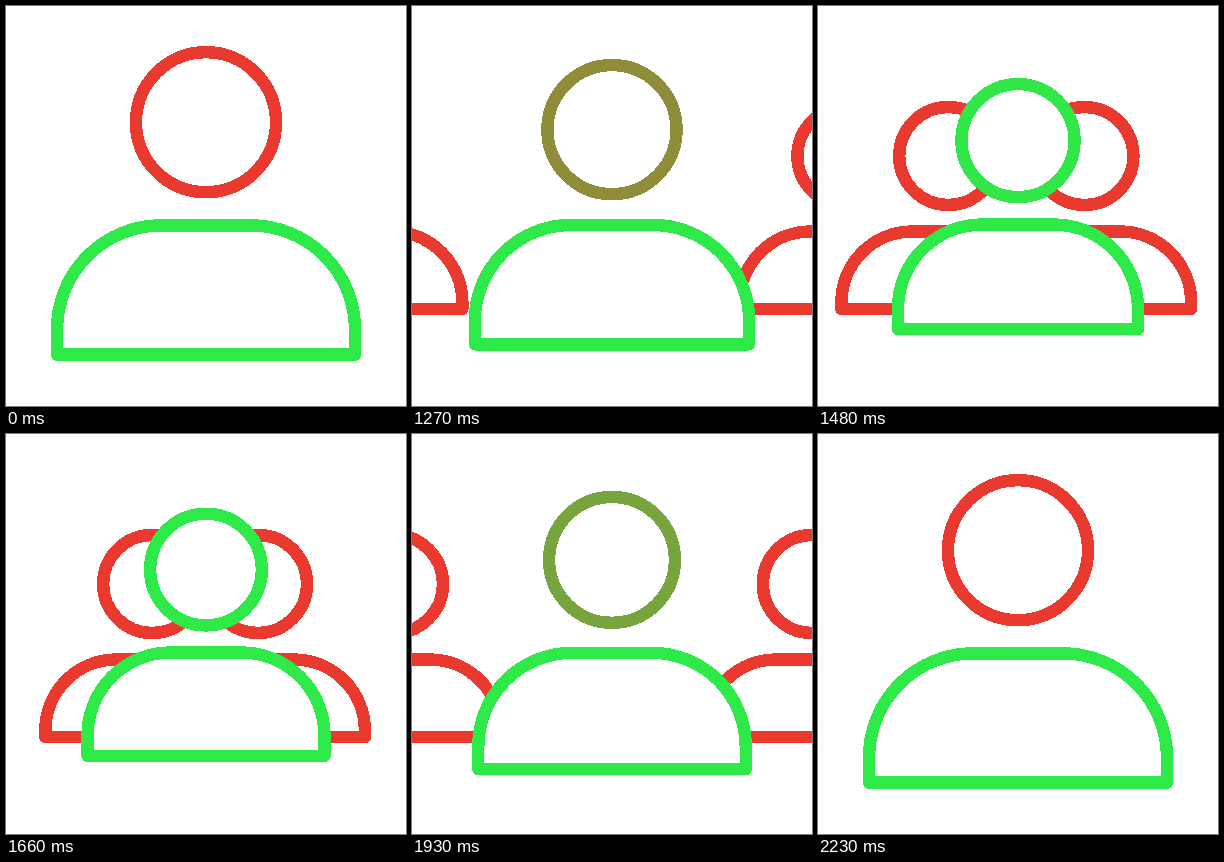
Animation of 400 by 400 pixels, one loop 2260 ms. Source, as an HTML page:

```html
<!DOCTYPE html>
<html lang="en">
<head>
<meta charset="utf-8">
<style>
  html, body { margin: 0; height: 100%; overflow: hidden; background: #fff; }
  svg { display: block; }
  svg * { fill: #fff; stroke-width: 12.4; stroke-linejoin: round; shape-rendering: crispEdges; }
</style>
</head>
<body>
<svg width="400" height="400" viewBox="0 0 400 400"></svg>
<script>
const svg = document.querySelector("svg");
const LOOP = 2260, STEP = 30, START = 1000, MOVE = 600, END = 2230;
const RED = [234, 57, 46], GREEN = [45, 234, 72];

const mix = (a, b, p) => a + (b - a) * p;
const clamp = v => Math.min(1, Math.max(0, v));
const rgb = c => `rgb(${c.map(Math.round)})`;

// cubic-bezier(.58, 0, .42, 1), solved by bisection
function ease(x) {
  if (x <= 0 || x >= 1) return clamp(x);
  let lo = 0, hi = 1, t;
  for (let i = 0; i < 24; i++) {
    t = (lo + hi) / 2;
    const s = 1 - t;
    if (3 * s * s * t * 0.58 + 3 * s * t * t * 0.42 + t * t * t < x) lo = t;
    else hi = t;
  }
  return t * t * (3 - 2 * t);
}

function add(tag) {
  return svg.appendChild(document.createElementNS("http://www.w3.org/2000/svg", tag));
}

function set(el, attrs) {
  for (const name in attrs) el.setAttribute(name, attrs[name]);
}

function person() {
  const body = add("path"), head = add("circle");
  return {
    body(x, top, bottom, half, r, color) {
      const flat = 2 * (half - r);
      set(body, {
        d: `M${x - half} ${bottom}V${top + r}a${r} ${r} 0 0 1 ${r} ${-r}h${flat}` +
           `a${r} ${r} 0 0 1 ${r} ${r}V${bottom}Z`,
        stroke: rgb(color)
      });
    },
    head(cx, cy, r, color) {
      set(head, { cx, cy, r, stroke: rgb(color) });
    }
  };
}

const left = person(), right = person(), middle = person();

function placeSide(side, x) {
  side.body(x, 225.5, 303, 106.8, 71, RED);
  side.head(x, 150, 49, RED);
}

function draw(time) {
  const t = Math.floor((time - START) / STEP) * STEP + START;
  const u = clamp(Math.min(t - START, END - t) / MOVE);
  const p = ease(u), tint = ease(u / 0.92);
  const half = mix(149, 118.4, p);

  placeSide(left, mix(-183, 147, p));
  placeSide(right, mix(548.4, 251.3, p));
  middle.body(200, mix(219.3, 218.5, p), mix(348.6, 321.8, p), half, half * 0.7, GREEN);
  middle.head(200, mix(116.2, 135.6, p), mix(70, 55.8, p), RED.map((c, i) => mix(c, GREEN[i], tint)));
}

function tick() {
  draw(performance.now() % LOOP);
  requestAnimationFrame(tick);
}
tick();
</script>
</body>
</html>
```
